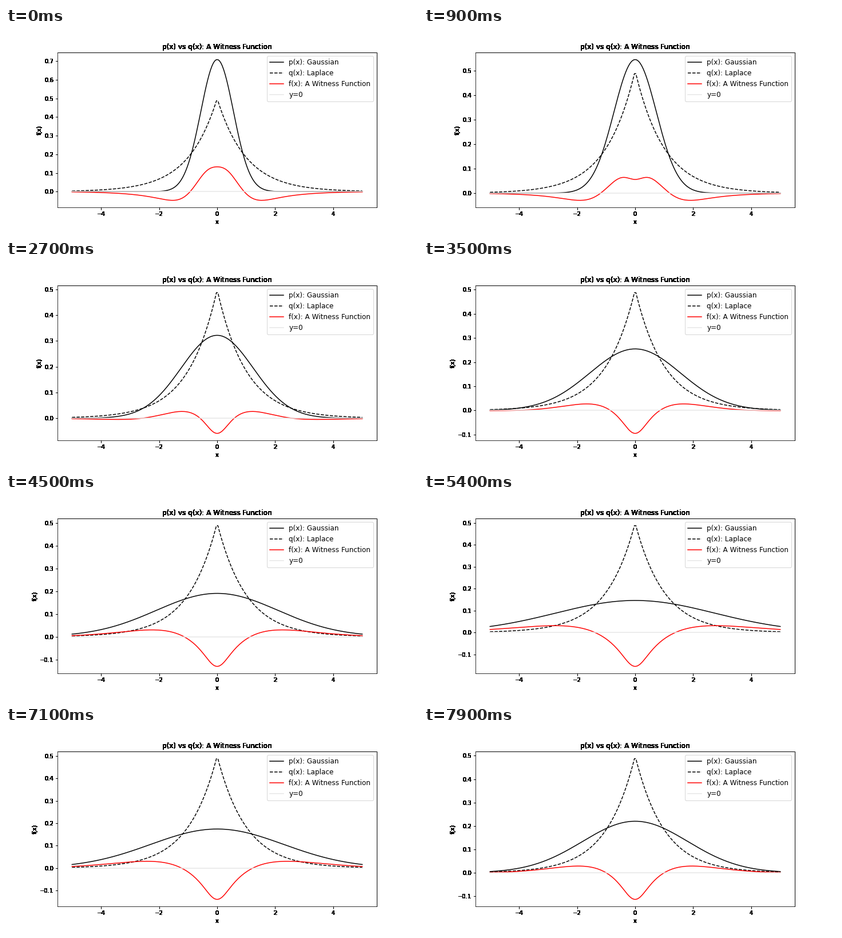
A matplotlib script for the animation above (8000 ms loop, 720 by 360 pixels).

```python
import matplotlib.pyplot as plt
import numpy as np
from matplotlib.animation import FuncAnimation

GAMMA = 10          # kernel k(x, y) = exp(-GAMMA * (x - y)**2)
STEPS = 60
FRAMES = 80

x = np.linspace(-5, 5, 200)
rising = np.logspace(-0.5, 1, STEPS)
variances = np.concatenate([rising, rising[::-1]])


def gaussian(variance):
    return np.exp(-x**2 / (2 * variance)) / np.sqrt(2 * np.pi * variance)


def laplace(t):
    return np.exp(-np.abs(t)) / 2


def smoothed_gaussian(variance):
    spread = 1 + 2 * GAMMA * variance
    return np.exp(-GAMMA * x**2 / spread) / np.sqrt(spread)


def smoothed_laplace():
    y, dy = np.linspace(-12, 12, 4801, retstep=True)
    kernel = np.exp(-GAMMA * (x[:, None] - y)**2)
    return kernel @ laplace(y) * dy


def harden(image, dpi):
    """Turn every touched pixel solid black, without soft edges."""
    solid = np.zeros_like(image)
    solid[..., 3] = image[..., 3] > 0
    return solid, 0, 0


fig, ax = plt.subplots(figsize=(10, 5), dpi=72)
fig.subplots_adjust(left=0.125, right=0.9, bottom=0.125, top=0.88)

p_line, = ax.plot(x, gaussian(variances[0]), "k", label="p(x): Gaussian")
ax.plot(x, laplace(x), "k--", label="q(x): Laplace")
f_line, = ax.plot(x, 0 * x, "r", label="f(x): A Witness Function")
ax.plot(x, 0 * x, color="0.9", label="y=0")

ax.set_title("p(x) vs q(x): A Witness Function", fontsize=12)
ax.set_xlabel("x")
ax.set_ylabel("f(x)")
ax.legend(loc="upper right", fontsize=12)

for artist in (ax.title, ax.xaxis, ax.yaxis, ax.spines["top"], ax.spines["right"]):
    artist.set_agg_filter(harden)

q_smooth = smoothed_laplace()


def update(frame):
    variance = variances[frame]
    p_line.set_ydata(gaussian(variance))
    f_line.set_ydata(smoothed_gaussian(variance) - q_smooth)
    ax.relim()
    ax.autoscale_view()
    return p_line, f_line


animation = FuncAnimation(fig, update, frames=FRAMES, interval=100,
                          repeat=True, repeat_delay=0, blit=False)
plt.show()
```
